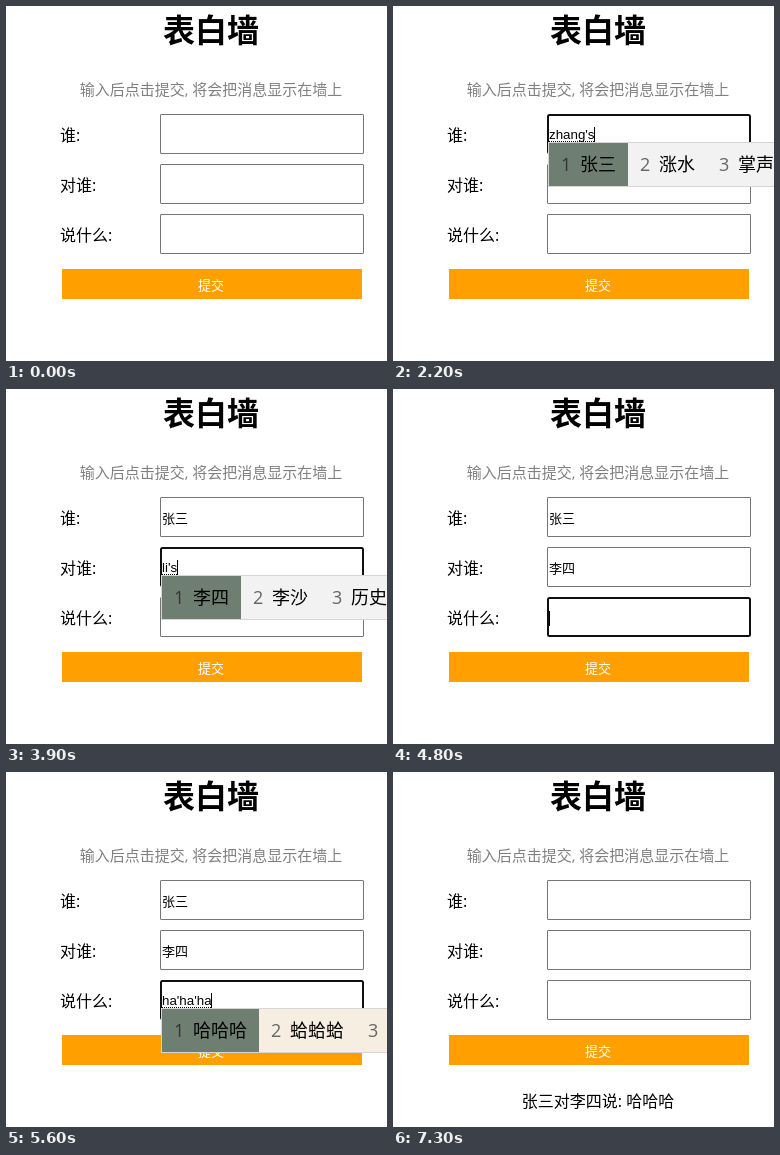
An HTML page that plays this animation: 381 px wide and 355 px high, repeating every 8.3 s.

```html
<!DOCTYPE html>
<html lang="zh-CN">
<head>
<meta charset="utf-8">
<style>
html, body { margin: 0; width: 100%; height: 100%; overflow: hidden; background: #fff; }
svg { display: block; font: 16px "Open Sans", "Noto Sans CJK SC", "Noto Sans CJK", sans-serif; }
.input { font: 13px "Liberation Sans", "Noto Sans CJK SC", "Noto Sans CJK", sans-serif; }
.latin { font-size: 13.333px; }
</style>
</head>
<body>
<svg id="stage" width="381" height="355"></svg>
<script>
const LOOP = 8300, SUBMIT = 6600, BLINK = 500;
const stage = document.getElementById("stage");

// [time, field, typed text, candidates while composing]
const edits = [
  [800, 0, ""],
  [1300, 0, "z"],
  [1400, 0, "z", "在 中 这 则"],
  [1500, 0, "zh", "中 这 之 张"],
  [1600, 0, "zha", "扎 炸 查 渣"],
  [1800, 0, "zhan", "站 战 占 展"],
  [1900, 0, "zhang", "张 长 章 掌"],
  [2200, 0, "zhang's", "张三 涨水 掌声"],
  [2300, 0, "zhang'sa", "张三 涨洒 张"],
  [2400, 0, "zhang'san", "张三 张 长"],
  [2600, 0, "张三"],
  [3200, 1, ""],
  [3700, 1, "l", "了 来 里 啦"],
  [3800, 1, "li", "里 李 力 离"],
  [3900, 1, "li's", "李四 李沙 历史"],
  [4000, 1, "li'si", "李四 立司 里斯"],
  [4100, 1, "李四"],
  [4800, 2, ""],
  [5200, 2, "h", "和 好 会 还"],
  [5300, 2, "ha", "哈 蛤 铪 嗨"],
  [5400, 2, "ha'h", "哈哈 哈韩 哈好"],
  [5500, 2, "ha'ha", "哈哈 蛤蛤 哈"],
  [5600, 2, "ha'ha'ha", "哈哈哈 蛤蛤蛤 哈"],
  [5900, 2, "哈哈哈"]
];
// [from, to, field under the pointer]
const hovers = [[200, 800, 0], [3000, 3200, 1], [4500, 4800, 2], [7100, 7200, 2], [7200, 7300, 1]];

const isLatin = str => /[a-z]/.test(str);
const rect = (x, y, w, h, fill, more = "") =>
  `<rect x="${x}" y="${y}" width="${w}" height="${h}" fill="${fill}" ${more}/>`;
const text = (x, y, str, more = "") => `<text x="${x}" y="${y}" ${more}>${str}</text>`;
const centred = (y, str, more = "") => text(205, y, str, `text-anchor="middle" ${more}`);

const pen = document.createElement("canvas").getContext("2d");
pen.font = '13.333px "Liberation Sans", sans-serif';
const widthOf = str => isLatin(str) ? pen.measureText(str).width : 13 * str.length;

function field(i, value, focused, hovered) {
  const line = focused ? 2 : 1;
  const colour = focused ? "#101010" : hovered ? "#4f4f4f" : "#767676";
  const latin = isLatin(value);
  return text(54, 135 + 50 * i, ["谁:", "对谁:", "说什么:"][i]) +
    rect(154 + line / 2, 108 + 50 * i + line / 2, 204 - line, 40 - line, "#fff",
      `stroke="${colour}" stroke-width="${line}" rx="${focused ? 1.5 : .5}"`) +
    text(156, (latin ? 133 : 134) + 50 * i, value, `class="input${latin ? " latin" : ""}"`);
}

function popup(i, list) {
  const y = 136 + 50 * i;
  let x = 156;
  let out = rect(155.5, y + .5, 240, 44, i == 2 ? "#f7eee2" : "#f2f2f2", 'stroke="#d6d6d6"');
  list.split(" ").forEach((word, n) => {
    const width = 43 + 18 * word.length;
    if (!n) out += rect(x, y + 1, width, 43, "#6e7f72");
    out += text(x + 12, y + 29, n + 1, `font-size="18" fill="${n ? "#666" : "#333"}"`) +
      text(x + 31, y + 29, word, 'font-size="18"');
    x += width;
  });
  return out;
}

function draw(t) {
  const values = ["", "", ""];
  let edit = null;
  if (t < SUBMIT) for (const e of edits) {
    if (e[0] > t) break;
    edit = e;
    values[e[1]] = e[2];
  }
  const hover = hovers.find(([from, to]) => t >= from && t < to);
  let out = centred(36, "表白墙", 'font-size="32" font-weight="700"') +
    centred(89, "输入后点击提交, 将会把消息显示在墙上", 'font-size="15" fill="#808080"');
  values.forEach((v, i) => {
    out += field(i, v, edit && edit[1] == i, hover && hover[2] == i);
  });
  out += rect(56, 263, 300, 30, "#ffa000") + centred(284, "提交", 'class="input" fill="#fff"');

  if (edit) {
    const [start, i, typed, list] = edit;
    const end = 156 + widthOf(typed), latin = isLatin(typed);
    if (latin) {
      const y = 135.5 + 50 * i;
      out += `<path d="M156 ${y}H${end}" stroke="#000" stroke-dasharray="1 1"/>`;
    }
    if (t - start < BLINK) out += rect(Math.floor(end), (latin ? 121 : 122) + 50 * i, 1, 15, "#000");
    if (list) out += popup(i, list);
  }
  if (t >= SUBMIT) out += centred(335, "张三对李四说: 哈哈哈");
  return out;
}

let shown = "";
function tick() {
  const next = draw(performance.now() % LOOP);
  if (next != shown) stage.innerHTML = shown = next;
  requestAnimationFrame(tick);
}
tick();
</script>
</body>
</html>
```
